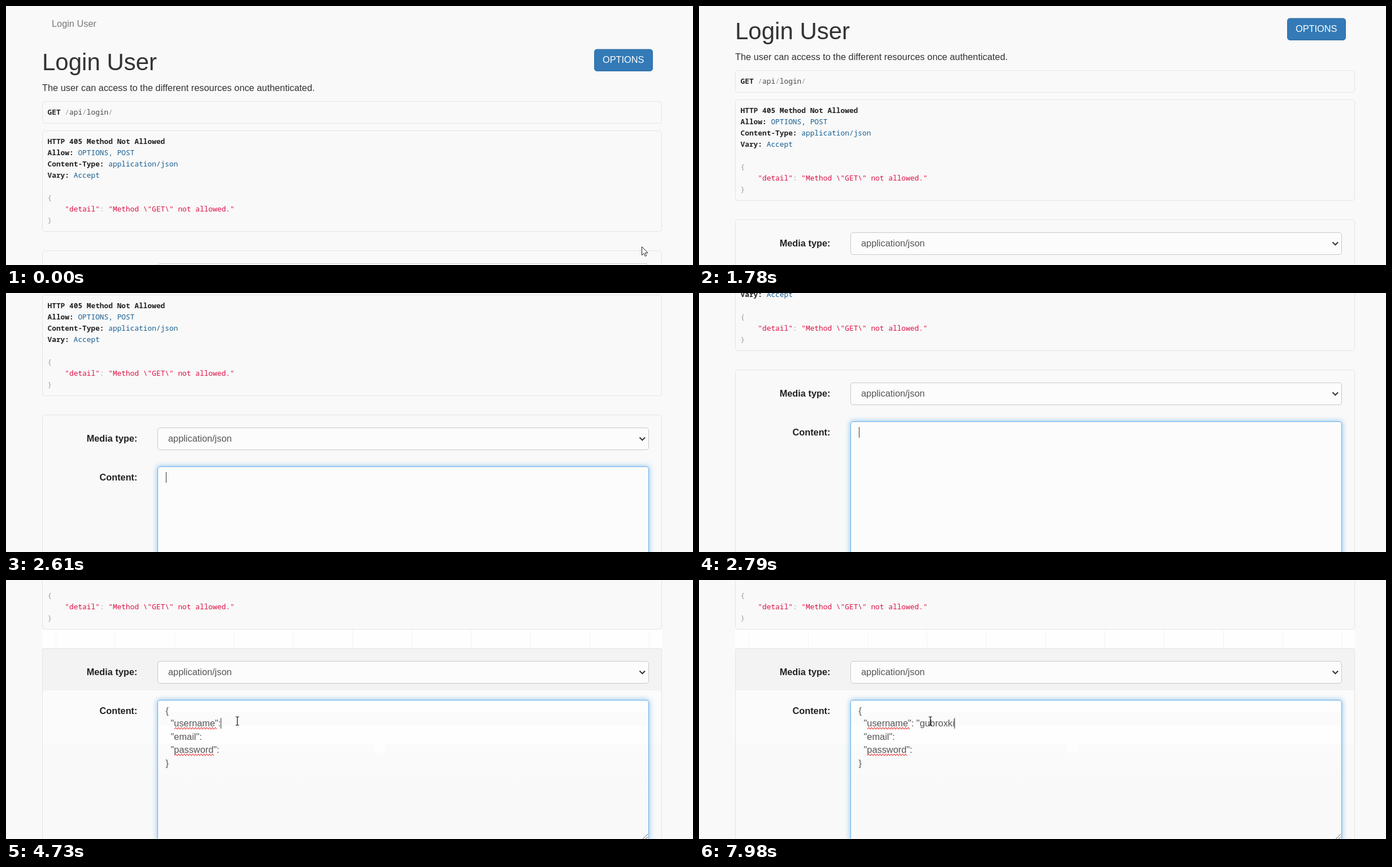
An HTML page for the animation above (8000 ms loop, 1216 by 460 pixels).

```html
<!DOCTYPE html>
<html lang="en">
<head>
<meta charset="utf-8">
<title>Login User</title>
<style>
  html, body { margin: 0; width: 100%; height: 100%; overflow: hidden; background: #f9f9f9; }
  svg { display: block; width: 1216px; height: 460px; }
  text { white-space: pre; font: 16.33px "Liberation Sans", Arial, sans-serif; fill: #333; }
  .mono { font: 12.83px "Noto Sans Mono", "DejaVu Sans Mono", monospace; fill: #48484c; }
  .b { font-weight: bold; fill: #222; }
  .lit { fill: #195f91; }
  .str { fill: #d14; }
  .pun { fill: #93a1a1; }
  .field { fill: #555; }
  .box { fill: none; stroke: #e4e4e4; }
  .squiggle { fill: none; stroke: #e33; stroke-width: 1.1; }
</style>
</head>
<body>
<svg viewBox="0 0 1216 460">
  <defs>
    <filter id="blur" x="-5%" y="-15%" width="110%" height="130%"><feGaussianBlur stdDeviation="4"/></filter>
    <linearGradient id="fade" x1="0" y1="0" x2="0" y2="1">
      <stop offset="0" stop-color="#fbfbfb"/><stop offset=".5" stop-color="#f9f9f9"/>
    </linearGradient>
  </defs>
  <rect width="1216" height="460" fill="#f9f9f9"/>
  <g id="page">
    <text x="81" y="37" style="fill:#777">Login User</text>
    <text x="64" y="114" style="font-size:42px">Login User</text>
    <rect x="1041.5" y="77" width="103" height="38.5" rx="4.5" fill="#337ab7" stroke="#2e6da4"/>
    <text x="1056" y="101" style="fill:#fff">OPTIONS</text>
    <text x="64" y="151">The user can access to the different resources once authenticated.</text>

    <rect class="box" x="64.5" y="169.5" width="1096" height="39" rx="4.5"/>
    <text class="mono" x="73.5" y="193"><tspan class="b">GET</tspan> <tspan class="pun">/</tspan>api<tspan class="pun">/</tspan>login<tspan class="pun">/</tspan></text>

    <rect class="box" x="64.5" y="221.5" width="1096" height="179" rx="4.5"/>
    <text class="mono b" x="73.5" y="245">HTTP 405 Method Not Allowed</text>
    <g id="headers"></g>
    <text class="mono pun" x="73.5" y="345">{</text>
    <text class="mono str" x="73.5" y="365">    "detail"<tspan class="pun">:</tspan> "Method \"GET\" not allowed."</text>
    <text class="mono pun" x="73.5" y="385">}</text>

    <g id="bands">
      <rect x="64" y="401" width="1097" height="33" fill="#fefefe"/>
      <path id="ticks" stroke="#f4f4f4"/>
      <rect x="64" y="434" width="1097" height="75" fill="#f3f3f3"/>
      <rect x="64" y="509" width="1097" height="94" fill="#fbfbfb"/>
    </g>
    <rect class="box" x="64.5" y="434.5" width="1096" height="420" rx="4.5"/>
    <text class="b" x="232.5" y="482" text-anchor="end">Media type:</text>
    <rect x="268.5" y="457.5" width="869" height="39" rx="4.5" fill="#fcfcfc" stroke="#c8c8c8"/>
    <text class="field" x="287" y="482">application/json</text>
    <path d="M1121.5 474.5l4.8 4.8 4.8-4.8" fill="none" stroke="#333" stroke-width="2"/>

    <text class="b" x="232.5" y="551" text-anchor="end">Content:</text>
    <rect x="268" y="526" width="870" height="250" rx="5" fill="#66afe9" stroke="#66afe9" stroke-width="3" opacity=".6" filter="url(#blur)"/>
    <rect x="268.5" y="526.5" width="869" height="249" rx="4.5" fill="#fcfcfc" stroke="#66afe9"/>
    <g id="fieldBands">
      <rect x="269" y="529" width="868" height="74" fill="#fefefe"/>
      <rect x="269" y="547" width="868" height="24" fill="#fbfbfb"/>
      <rect x="269" y="603" width="868" height="170" fill="url(#fade)"/>
    </g>
    <circle id="spot" cx="661" cy="609" r="11" fill="#fefefe"/>
    <path d="M1127 773l9-9M1132 773l4-4" stroke="#666"/>
    <g id="json">
      <text class="field" x="282.5" y="551">{</text>
      <text class="field" id="typed" x="282.5" y="573"></text>
      <text class="field" x="282.5" y="597">  "email":</text>
      <text class="field" x="282.5" y="620">  "password":</text>
      <text class="field" x="282.5" y="644">}</text>
      <path class="squiggle" id="wave1"/>
      <path class="squiggle" id="wave2"/>
    </g>
    <rect id="caret" width="1" height="19" fill="#333"/>
  </g>
  <path id="arrow" d="M.5.5v15l3.5-3.2 2.3 5.2 2.4-1-2.3-5.1h4.6z" fill="#fff" stroke="#222"/>
  <path id="beam" d="M-3-7.5h2l1 1 1-1h2M0-6.5v13M-3 7.5h2l1-1 1 1h2" fill="none" stroke="#111" stroke-width="1.2"/>
</svg>
<script>
const LOOP = 8000;
const $ = id => document.getElementById(id);
const show = (el, on) => el.setAttribute('visibility', on ? 'visible' : 'hidden');
const move = (el, x, y) => el.setAttribute('transform', `translate(${x} ${y})`);

// Latest entry [time, ...values] that has started
const at = (keys, t) => keys.filter(k => k[0] <= t).pop();

const scroll = [
  [0, 0], [1500, 6], [1600, 24], [1690, 43], [1780, 55],
  [2090, 59], [2140, 64], [2200, 68],
  [2460, 82], [2510, 122], [2560, 174], [2610, 218], [2670, 262], [2760, 298], [2850, 313]
];
const arrowPath = [[0, 1125, 427], [70, 1156, 275]];
const beamPath = [
  [3080, 912, 297], [3160, 850, 299], [3250, 736, 299], [3330, 663, 297],
  [3870, 655, 295], [3950, 628, 289], [4020, 584, 280], [4090, 530, 270], [4160, 482, 262],
  [4230, 450, 257], [4300, 429, 253], [4380, 416, 251], [4470, 411, 250], [4600, 409, 251]
];
const caretOn = [
  [0, true], [3000, false], [3530, true], [3740, false], [4730, true],
  [5260, false], [5530, true], [6490, false], [6690, true]
];
const keyTimes = [5530, 5930, 6690, 6820, 7020, 7240, 7310, 7580, 7850, 7980];
const entry = ' "gubroxki';
const PASTE = 3740;

[['Allow:', 'OPTIONS, POST'], ['Content-Type:', 'application/json'], ['Vary:', 'Accept']].forEach(([name, value], i) => {
  $('headers').innerHTML +=
    `<text class="mono" x="73.5" y="${265 + 20 * i}"><tspan class="b">${name}</tspan> <tspan class="lit">${value}</tspan></text>`;
});

let ticks = '';
for (let x = 88.5; x < 1161; x += 105) ticks += `M${x} 401v33`;
$('ticks').setAttribute('d', ticks);

function wave(id, x, y, width) {
  let d = `M${x} ${y}`;
  for (let i = 0; i < width / 5; i++) d += 'l2.5-3 2.5 3';
  $(id).setAttribute('d', d);
}
wave('wave1', 298, 578, 72);
wave('wave2', 298, 625, 69);

function draw(t) {
  move($('page'), 0, -at(scroll, t)[1]);
  ['bands', 'fieldBands'].forEach(id => show($(id), t >= 2850));
  show($('spot'), t >= 3330);

  show($('arrow'), t < 140);
  move($('arrow'), ...at(arrowPath, t).slice(1));
  const beam = at(beamPath, t);
  show($('beam'), beam);
  if (beam) move($('beam'), beam[1] + .5, beam[2] - .5);

  const pasted = t >= PASTE;
  show($('json'), pasted);
  const count = keyTimes.filter(k => k <= t).length;
  $('typed').textContent = '  "username":' + entry.slice(0, count);
  const x = pasted ? Math.round(282.5 + $('typed').getComputedTextLength()) : 283;
  move($('caret'), x, pasted ? 558 : 536);
  show($('caret'), at(caretOn, t)[1]);
}

const start = performance.now();
function tick() {
  draw((performance.now() - start) % LOOP);
  requestAnimationFrame(tick);
}
tick();
</script>
</body>
</html>
```
